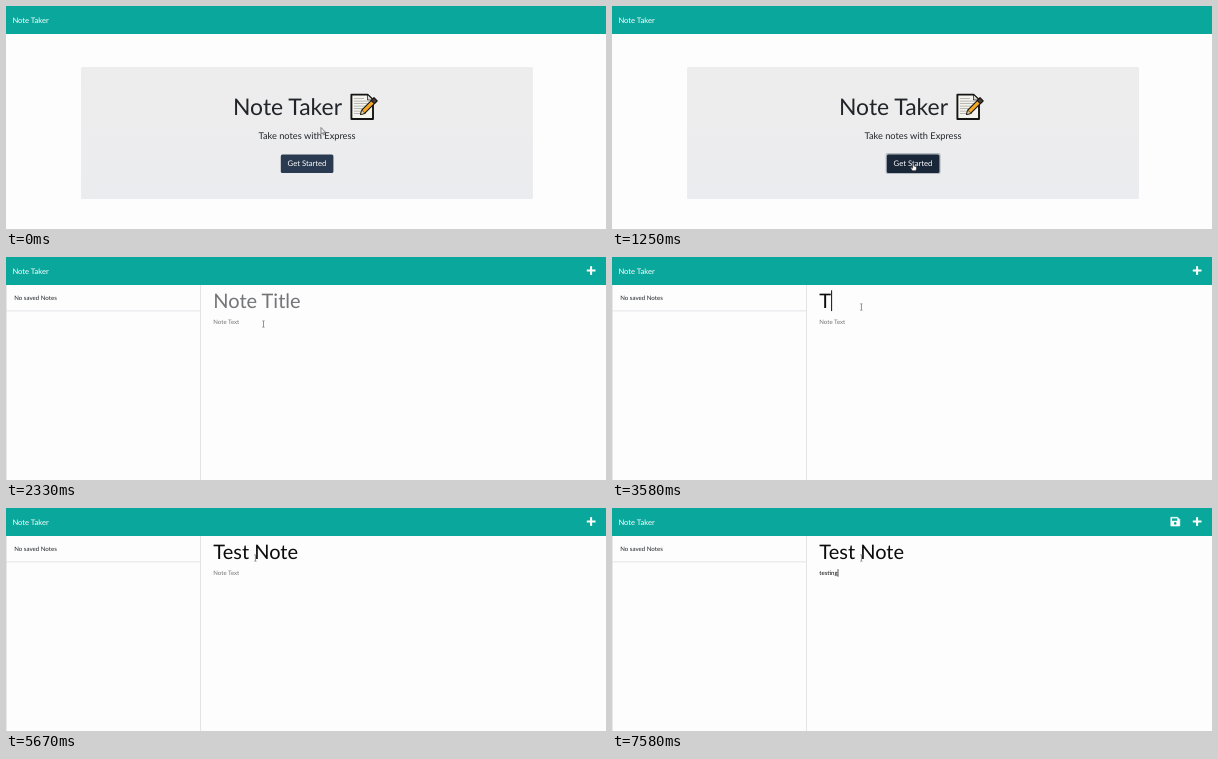
An HTML page with a canvas for the animation above (8 s loop, 600 by 223 pixels).

```html
<!DOCTYPE html>
<html lang="en">
<head>
<meta charset="utf-8">
<title>Note Taker</title>
<style>
html, body { margin: 0; width: 100%; height: 100%; overflow: hidden; background: #fdfdfe; }
canvas { display: block; width: 600px; height: 223px; }
</style>
</head>
<body>
<canvas id="stage"></canvas>
<script>
const W = 600, H = 223, LOOP = 8000, TICK = 1000 / 12;
const TEAL = '#0aa89c', INK = '#212529', GREY = '#747577';
const canvas = document.getElementById('stage');
const ctx = canvas.getContext('2d');
const dpr = window.devicePixelRatio || 1;
canvas.width = W * dpr;
canvas.height = H * dpr;

// Typing: the moment each character lands
const title = { text: 'Test Note', at: [3580, 3830, 4000, 4250, 4330, 4580, 4920, 5000, 5080] };
const body = { text: 'testing', at: [6670, 6830, 7000, 7170, 7420, 7500, 7580] };
// Caret visibility spans
const titleCaret = [[2670, 3250], [3580, 5670]];
const bodyCaret = [[5750, 6330], [6670, 8000]];
const PAGE_AT = 1330;

const typed = (f, t) => f.text.slice(0, f.at.filter(a => t >= a).length);
const within = (spans, t) => spans.some(([a, b]) => t >= a && t < b);
const clamp = v => Math.max(0, Math.min(1, v));
const ease = p => p * p * (3 - 2 * p);
const mix = (a, b, p) => a + (b - a) * p;

function rect(x, y, w, h, fill) {
  ctx.fillStyle = fill;
  ctx.fillRect(x, y, w, h);
}

function round(x, y, w, h, r, fill) {
  ctx.beginPath();
  ctx.roundRect(x, y, w, h, r);
  ctx.fillStyle = fill;
  ctx.fill();
}

function shape(points, fill, line, width) {
  ctx.beginPath();
  points.forEach(([x, y]) => ctx.lineTo(x, y));
  ctx.closePath();
  if (fill) { ctx.fillStyle = fill; ctx.fill(); }
  if (line) { ctx.strokeStyle = line; ctx.lineWidth = width; ctx.stroke(); }
}

function font(size) {
  ctx.font = `${size}px Lato, sans-serif`;
  ctx.textRendering = 'geometricPrecision';
}

function label(str, x, y, size, fill, align = 'left') {
  font(size);
  ctx.textAlign = align;
  ctx.fillStyle = fill;
  ctx.fillText(str, x, y);
}

function memo(x, y) {
  ctx.save();
  ctx.translate(x, y);
  ctx.lineJoin = 'round';
  ctx.lineCap = 'round';
  shape([[1.4, 1.6], [17.5, 1.6], [23, 7], [23, 26], [1.4, 26]], '#f4f3ec', '#151515', 1.9);
  shape([[17.5, 1.8], [17.5, 7], [22.8, 7]], '#d9d8d2', '#151515', 0.7);
  for (let i = 0; i < 7; i++) rect(4, 5.2 + i * 2.5, i < 1 ? 10 : 15 - (i > 3 ? 3 : 0), 0.8, '#a9aaa8');
  // pencil
  ctx.translate(10.5, 21.5);
  ctx.rotate(-0.79);
  shape([[0, 0], [4, -2.2], [21, -2.2], [21, 2.2], [4, 2.2]], '#f6a823', '#151515', 1.1);
  shape([[0, 0], [4, -2.2], [4, 2.2]], '#efd0a0', '#151515', 0.6);
  shape([[17.5, -2.2], [21.5, -2.2], [21.5, 2.2], [17.5, 2.2]], '#4b3a37', '#151515', 1);
  ctx.restore();
}

function arrow(x, y) {
  shape([[x, y], [x, y + 6.6], [x + 1.5, y + 5.3], [x + 2.5, y + 7.4], [x + 3.5, y + 7],
    [x + 2.6, y + 4.9], [x + 4.6, y + 4.8]], '#f4f4f4', '#555', 0.7);
}

function hand(x, y) {
  shape([[x - 0.6, y + 0.2], [x + 0.5, y + 0.2], [x + 0.7, y + 3], [x + 3, y + 3.6], [x + 3.3, y + 5.2],
    [x + 2.6, y + 7.8], [x - 0.8, y + 7.8], [x - 2.6, y + 4.9], [x - 1.9, y + 4.3], [x - 0.7, y + 5.2]],
    '#fff', '#333', 0.7);
}

function beam(x, y) {
  rect(x - 0.35, y - 3, 0.7, 6, '#666');
  rect(x - 1.3, y - 3.4, 2.6, 0.6, '#777');
  rect(x - 1.3, y + 2.8, 2.6, 0.6, '#777');
}

function nav() {
  rect(0, 0, W, 28, TEAL);
  label('Note Taker', 6.4, 16.7, 7.63, '#fff');
}

function home(t) {
  rect(0, 0, W, H, '#fdfdfd');
  nav();
  const shade = ctx.createLinearGradient(0, 61, 0, 193);
  shade.addColorStop(0, '#eeeded');
  shade.addColorStop(1, '#ebecef');
  round(75, 61, 452, 132, 1.5, shade);
  label('Note Taker', 227, 109.2, 22.9, INK);
  memo(344, 87);
  label('Take notes with Express', 301, 133, 9.27, INK, 'center');

  const p = ease(clamp((t - 60) / 770));
  const x = mix(315, 301.3, p), y = mix(121.5, 157, p);
  const over = y > 148;
  if (t >= 1170) round(273.6, 147, 55, 21, 2, '#b4bac2');
  round(274.8, 148.4, 52.6, 18.6, 1.6, over ? '#1a2738' : '#2a3b51');
  label('Get Started', 301, 160.1, 7.7, '#fff', 'center');
  (over ? hand : arrow)(x, y);
}

function saveIcon() {
  shape([[558.8, 9.3], [565.6, 9.3], [567.8, 11.5], [567.8, 18], [558.8, 18]], '#fff', '#fff', 0.6);
  rect(560, 10.4, 5.3, 2.4, TEAL);
  ctx.beginPath();
  ctx.arc(563.2, 15.4, 1.3, 0, Math.PI * 2);
  ctx.fillStyle = TEAL;
  ctx.fill();
}

function field(f, hint, y, size, caret, t) {
  const x = 207.3, str = typed(f, t);
  label(str || hint, x, y, size, str ? '#0c0c0c' : GREY);
  if (within(caret, t)) {
    font(size);
    const end = x + ctx.measureText(str).width;
    const big = size > 10;
    rect(end, y - size * (big ? 0.9 : 0.98), big ? 1 : 0.7, size * (big ? 1.04 : 1.25), '#111');
  }
}

function notes(t, tick) {
  rect(0, 0, W, H, '#fdfdfe');
  nav();
  rect(580.8, 12.5, 8.7, 2, '#fff');
  rect(584.1, 9.2, 2, 8.7, '#fff');
  if (typed(body, t)) saveIcon();
  rect(0, 28, 0.7, H, '#dedee2');
  rect(194, 28, 0.8, H, '#dedee2');
  rect(0, 53.5, 194, 0.8, '#dedee2');
  label('No saved Notes', 8.2, 43.2, 6.13, INK);
  field(title, 'Note Title', 51.3, 20, titleCaret, t);
  field(body, 'Note Text', 67.1, 6.1, bodyCaret, t);

  if (t < 1920) hand(301.5, 157);
  else {
    const p = ease(clamp((tick - 1830) / 670));
    beam(mix(301.5, 249.3, p), mix(160, 50, p));
  }
}

function draw(now) {
  const t = now % LOOP;
  const tick = Math.floor((t + 4) / TICK) * TICK;
  ctx.setTransform(dpr, 0, 0, dpr, 0, 0);
  if (t < PAGE_AT) home(tick);
  else notes(t, tick);
}

const start = performance.now();
function frame() {
  draw(performance.now() - start);
  requestAnimationFrame(frame);
}
frame();
</script>
</body>
</html>
```
